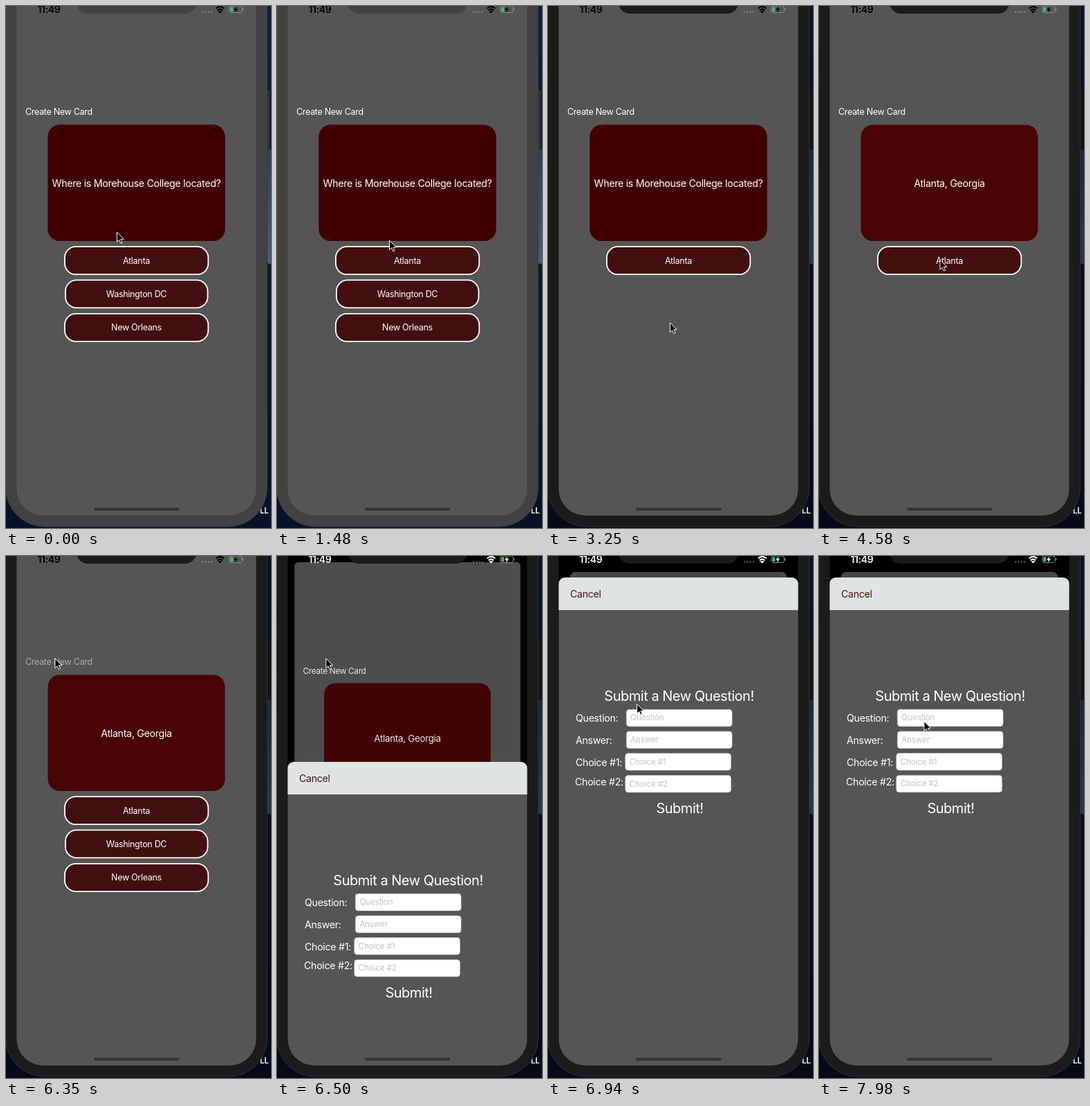
Write an HTML page that moves like this. It is 383 px wide and 753 px high and loops after 8000 ms.

```html
<!DOCTYPE html>
<html lang="en">
<head>
<meta charset="utf-8">
<title>Flashcard app demo</title>
<style>
  html, body { margin: 0; width: 100%; height: 100%; overflow: hidden; background: #071026; }
  svg { display: block; width: 383px; height: 753px; }
  text { font-family: Inter, "Open Sans", sans-serif; letter-spacing: -.024em; fill: #fff; }
  .small { font-size: 12.5px; }
  .body { font-size: 14.2px; letter-spacing: -.021em; }
  .title { font-size: 20px; }
  .hint { font-size: 11.9px; fill: #c4c4c6; }
  .mid { text-anchor: middle; }
  .button rect { fill: #430f0e; stroke: #fff; stroke-width: 1.8; }
  .field { fill: #fff; stroke: #ccc; stroke-width: .7; }
</style>
</head>
<body>
<svg viewBox="0 0 383 753">
  <defs>
    <clipPath id="screenClip"><rect x="15.5" y="-40" width="346" height="775" rx="38"/></clipPath>
    <linearGradient id="night" x2="0" y2="1">
      <stop offset="0" stop-color="#0f1d40"/>
      <stop offset="1" stop-color="#081129"/>
    </linearGradient>
    <linearGradient id="sky" x2="0" y2="1">
      <stop offset="0" stop-color="#2c405f"/>
      <stop offset="1" stop-color="#445e7c"/>
    </linearGradient>
  </defs>

  <!-- Desktop behind the phone -->
  <rect width="383" height="753" fill="url(#night)"/>
  <path d="M376 207H383V373L376 370Z" fill="url(#sky)"/>
  <rect id="desktopShade" width="383" height="753" fill="#000" opacity=".4"/>
  <text x="367" y="732" font-size="11.5" font-weight="600">LL</text>

  <!-- Phone body -->
  <rect id="power" x="375" y="122" width="6" height="85" rx="2"/>
  <rect id="bezel" x="-.5" y="-70" width="378" height="821" rx="56" stroke-width="1"/>
  <path id="sideKeys" d="M0 68V95M0 122V170M0 182V228" stroke="#0c0c0c" stroke-width="1.6"/>

  <g clip-path="url(#screenClip)">
    <rect id="backdrop" y="-40" width="383" height="800"/>
    <g id="home">
      <rect id="homeBack" x="15" y="-14" width="347" height="750" fill="#555"/>
      <text id="create" class="small" x="28" y="157">Create New Card</text>
      <g id="answer">
        <rect x="60.5" y="171.5" width="256" height="167.5" rx="17" fill="#480404"/>
        <text class="body mid" x="188.5" y="261">Atlanta, Georgia</text>
      </g>
      <g id="question">
        <rect x="60.5" y="171.5" width="256" height="167.5" rx="17" fill="#400000" opacity=".88"/>
        <text class="body mid" x="188.5" y="261">Where is Morehouse College located?</text>
      </g>
      <g id="buttons"></g>
      <rect id="dim" x="15" y="-15" width="347" height="751"/>
    </g>
    <g id="sheet">
      <path d="M15 720V9.5a9.5 9.5 0 0 1 9.5-9.5H352.5a9.5 9.5 0 0 1 9.5 9.5V720Z" fill="#555"/>
      <path d="M15 47V9.5a9.5 9.5 0 0 1 9.5-9.5H352.5a9.5 9.5 0 0 1 9.5 9.5V47Z" fill="#dfe3e4"/>
      <text class="body" x="32" y="29" style="fill:#521414">Cancel</text>
      <text class="title mid" x="189.5" y="178">Submit a New Question!</text>
      <g id="form"></g>
      <text class="title mid" x="190.5" y="340">Submit!</text>
    </g>
    <rect x="127" y="723.8" width="123.5" height="4.2" rx="2.1" fill="#333"/>
  </g>

  <rect id="notch" x="102" y="-30" width="173" height="41" rx="16"/>

  <!-- Status bar -->
  <text id="clock" x="45.5" y="10" font-size="14" font-weight="600">11:49</text>
  <g id="dots" fill="#808080">
    <circle cx="284" cy="8.5" r="1.3"/><circle cx="288.3" cy="8.5" r="1.3"/>
    <circle cx="292.6" cy="8.5" r="1.3"/><circle cx="296.9" cy="8.5" r="1.3"/>
  </g>
  <g id="wifi" fill="none" stroke-width="2">
    <path d="M303.7 3.6Q309.5 -1.6 315.3 3.6M305.8 6.2Q309.5 3 313.2 6.2"/>
    <path d="M309.5 9.2L308.6 8.3H310.4Z"/>
  </g>
  <rect x="322.8" y="0" width="18.4" height="9.6" rx="2.6" fill="none" stroke="#8a8a8a"/>
  <path d="M342.6 3.2V6.4" stroke="#8a8a8a" stroke-width="1.2"/>
  <rect x="324.2" y="1.4" width="4" height="6.8" rx="1.2" fill="#35c759"/>
  <path id="bolt" d="M333.5 .4L328.8 5.6H331.8L330.6 9.6L335.4 4.2H332.4Z"/>

  <path id="cursor" d="M.4 .4V14.2L3.5 11.2L5.8 16.2L8 15.2L5.8 10.3H10.2Z"
        fill="#000" stroke="#fff" stroke-width="1" stroke-linejoin="round"/>
</svg>

<script>
const LOOP = 8000, STEP = 147.8;
const $ = id => document.getElementById(id);
const set = (id, attrs) => {
  for (const name in attrs) $(id).setAttribute(name, attrs[name]);
};
const show = (id, visible) => set(id, { visibility: visible ? 'visible' : 'hidden' });

// Choice buttons: label, left, top, width
[['Atlanta', 84.9, 347.2, 207.4], ['Washington DC', 85.9, 395.4, 205.6], ['New Orleans', 84.9, 443.9, 207.4]]
  .forEach(([label, x, y, width], i) => {
    $('buttons').innerHTML += `<g class="button" id="choice${i}">
      <rect x="${x}" y="${y}" width="${width}" height="40" rx="16"/>
      <text id="label${i}" class="small mid" x="188.5" y="${y + 24.5}">${label}</text></g>`;
  });

// Form rows: label, label x, label baseline, field x, field top
[['Question', 40, 208, 113.4, 190.3], ['Answer', 40, 240, 113.4, 222],
 ['Choice #1', 40, 272, 111.8, 253.6], ['Choice #2', 39, 299.5, 111.8, 285.4]]
  .forEach(([label, x, y, left, top]) => {
    $('form').innerHTML += `<text class="body" x="${x}" y="${y}">${label}:</text>
      <rect class="field" x="${left}" y="${top}" width="152.6" height="24.4" rx="4"/>
      <text class="hint" x="${left + 5.8}" y="${top + 16}">${label}</text>`;
  });

// Pointer path: step, x, y
const path = [
  [0, 160, 326], [2, 162, 317], [4, 163, 306], [5, 160, 305], [7, 157, 312], [9, 157, 312],
  [13, 177.5, 415], [17, 177.5, 415], [20, 176, 456.5], [24, 176, 456.5], [28, 174.5, 366],
  [32, 174.5, 366], [37, 70.5, 147.5], [45, 70.5, 147.5], [48, 157, 246], [52, 157, 246], [54, 151.5, 238]
];

function pointer(step) {
  const next = path.findIndex(key => key[0] > step);
  if (next < 0) return path.at(-1).slice(1);
  const [t0, x0, y0] = path[next - 1], [t1, x1, y1] = path[next];
  const k = (step - t0) / (t1 - t0);
  return [x0 + (x1 - x0) * k, y0 + (y1 - y0) * k];
}

function render(time) {
  const step = Math.floor((time + 10) / STEP);

  // The simulator window gains focus on the first click
  const active = step >= 14;
  const body = active ? '#1b1b1b' : '#424242';
  set('bezel', { fill: body, stroke: active ? '#303030' : '#3a3a3a' });
  set('notch', { fill: body });
  set('power', { fill: active ? '#141414' : '#333' });
  show('desktopShade', active);
  show('sideKeys', active);

  const reset = step >= 43;
  show('choice1', step < 16 || reset);
  show('choice2', step < 22 || reset);
  set('label0', { opacity: step === 29 ? .2 : 1 });
  set('label1', { opacity: step === 15 ? .2 : 1 });
  set('label2', { opacity: step === 21 ? .2 : 1 });
  set('create', { opacity: step === 42 ? .2 : step === 43 ? .5 : 1 });
  show('question', step < 30);

  // Critically damped spring raises the sheet and pushes the home screen back
  const phase = Math.max(0, step - 43.3) * 3.01;
  const rise = 1 - (1 + phase) * Math.exp(-phase);
  show('backdrop', rise > 0);
  set('sheet', { transform: `translate(0 ${735 - 704 * rise})` });
  set('home', { transform: `translate(188.5 ${-14 + 37 * rise}) scale(${1 - .095 * rise}) translate(-188.5 14)` });
  set('homeBack', { rx: 9 * rise });
  set('dim', { opacity: .16 * rise, rx: 9 * rise });

  const ink = rise > .5 ? '#fff' : '#000';
  $('clock').style.fill = ink;
  set('wifi', { stroke: ink });
  set('bolt', { fill: ink });
  set('dots', { fill: rise > .5 ? '#555' : '#808080' });

  set('cursor', { transform: `translate(${pointer(step)})` });
}

const start = performance.now();
function tick() {
  render((performance.now() - start) % LOOP);
  requestAnimationFrame(tick);
}
tick();
</script>
</body>
</html>
```
